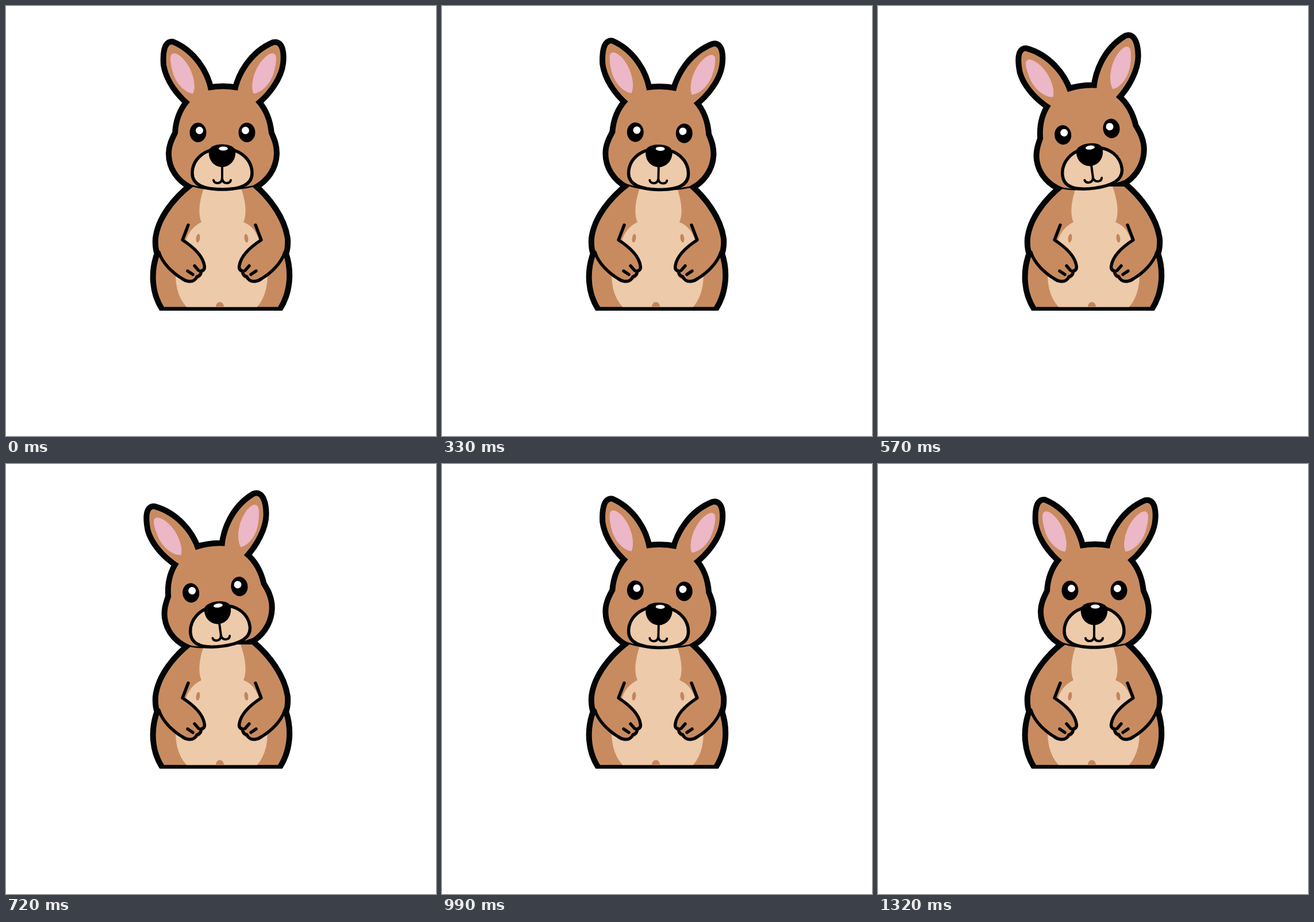
Recreate the animation shown at these times as an HTML page. Size 748 by 748 pixels, loop 1.35 s.

```html
<!DOCTYPE html>
<html lang="en">
<head>
<meta charset="utf-8">
<title>Kangaroo tilting its head</title>
<style>
  html, body { margin: 0; height: 100%; overflow: hidden; background: #fff; }
  svg { display: block; width: 100%; height: 100%; }
  .rim { fill: #030606; stroke: #030606; stroke-width: 20; stroke-linejoin: round; }
  .fur { fill: #c88b60; }
  .cream { fill: #edcaaa; }
  .spot { fill: #c4845c; }
  .line { stroke: #030606; stroke-width: 5.5; stroke-linecap: round; stroke-linejoin: round; }
  .open { fill: none; }
</style>
</head>
<body>
<svg viewBox="0 0 748 748">
  <defs>
    <clipPath id="floor"><rect width="748" height="530"/></clipPath>
    <path id="head" d="M352 147 Q377 142 403 147 C408 122 428 84 466 68
      C477 65 479 84 477 100 C474 124 454 151 434 167
      C449 183 455 201 457 222 C463 235 466 244 466 257 C465 282 450 302 430 312
      Q405 318 376 318 Q346 318 323 311 C303 301 288 281 288 257
      C288 244 293 234 299 222 C300 201 306 183 320 167
      C301 151 283 127 279 102 C278 87 279 66 289 67 C325 82 347 118 352 147Z"/>
    <path id="body" d="M326 314 C297 336 269 370 265 405 Q264 420 268 431
      C256 463 259 498 275 523.5 H473 C489 498 493 463 482 431
      Q486 420 485 405 C480 370 454 336 428 314Z"/>
    <path id="pink" fill="#ecb7c6" stroke="#ecb7c6" d="M287 87 C291 76 309 88 320 110
      C328 127 329 144 325 152 C312 150 299 138 292 120 Q285 98 287 87Z"/>
    <g id="arm">
      <path class="fur" d="M307 407 C326 418 348 440 345 457 Q341 479 319 479 Q311 478 306 474 C291 465 272 448 266 428Z"/>
      <path class="line open" d="M317 381 L307 407 C324 418 342 434 345 451
        Q347 460 339 461 Q340 469 332 471 Q328 480 318 479 Q311 478 306 474
        C291 465 272 448 266 428 M316 461 L325 467 M328 452 L335 460"/>
    </g>
  </defs>

  <g clip-path="url(#floor)"><use href="#body" class="rim"/></g>
  <use href="#head" class="rim tilt"/>

  <use href="#body" class="fur"/>
  <path class="cream" d="M345 314 C337 336 333 361 340 376 Q320 386 313 407 L340 440
    L295 470 Q296 504 314 523.5 H437 Q454 504 455 470 L412 440 L440 407 Q433 384 413 376
    C420 361 416 336 408 314Z"/>
  <ellipse class="spot" cx="334" cy="404" rx="3.3" ry="7.5" transform="rotate(8 334 404)"/>
  <ellipse class="spot" cx="418" cy="404" rx="3.3" ry="7.5" transform="rotate(-8 418 404)"/>
  <path class="spot" d="M365 523 Q366 515 372 515 Q378 515 379 523Z"/>
  <use href="#arm"/>
  <use href="#arm" transform="matrix(-1 0 0 1 751 0)"/>

  <g class="tilt">
    <use href="#head" class="fur line" style="paint-order: stroke"/>
    <use href="#pink"/>
    <use href="#pink" transform="matrix(-1 0 0 1 756 0)"/>
    <ellipse cx="334" cy="220" rx="14.5" ry="17"/>
    <ellipse cx="419" cy="220" rx="14.5" ry="17"/>
    <circle cx="336.5" cy="216.5" r="6.5" fill="#fff"/>
    <circle cx="416.5" cy="216.5" r="6.5" fill="#fff"/>
    <path class="cream line" d="M376 250 C345 246 324 268 324 291 C324 311 345 319 376 319
      C407 319 428 311 428 291 C428 268 407 246 376 250Z"/>
    <path d="M353 251 C357 237 395 237 399 251 C401 269 388 280 376 280 C363 280 351 269 353 251Z"/>
    <ellipse cx="378" cy="248" rx="8" ry="3.5" fill="#fff"/>
    <path class="line open" style="stroke-width:4" d="M376 278 V300
      Q375 308 368 308 Q362 308 361 303 M376 300 Q377 308 384 308 Q390 308 391 303"/>
  </g>
</svg>
<script>
  const LOOP = 1350, STEP = 30, RIGHT = 1.4, LEFT = -7.8;
  const parts = document.querySelectorAll('.tilt');

  // Eased progress from 0 to 1 between two times.
  const ease = (t, from, to) => {
    const p = Math.min(1, Math.max(0, (t - from) / (to - from)));
    return (1 - Math.cos(Math.PI * p)) / 2;
  };

  const angleAt = t =>
    RIGHT * (ease(t, 0, 200) - ease(t, 1125, 1320)) +
    (LEFT - RIGHT) * (ease(t, 390, 590) - ease(t, 700, 900));

  function draw() {
    const t = Math.floor(performance.now() % LOOP / STEP) * STEP;
    for (const part of parts) part.setAttribute('transform', `rotate(${angleAt(t)} 360 315)`);
    requestAnimationFrame(draw);
  }
  draw();
</script>
</body>
</html>
```
